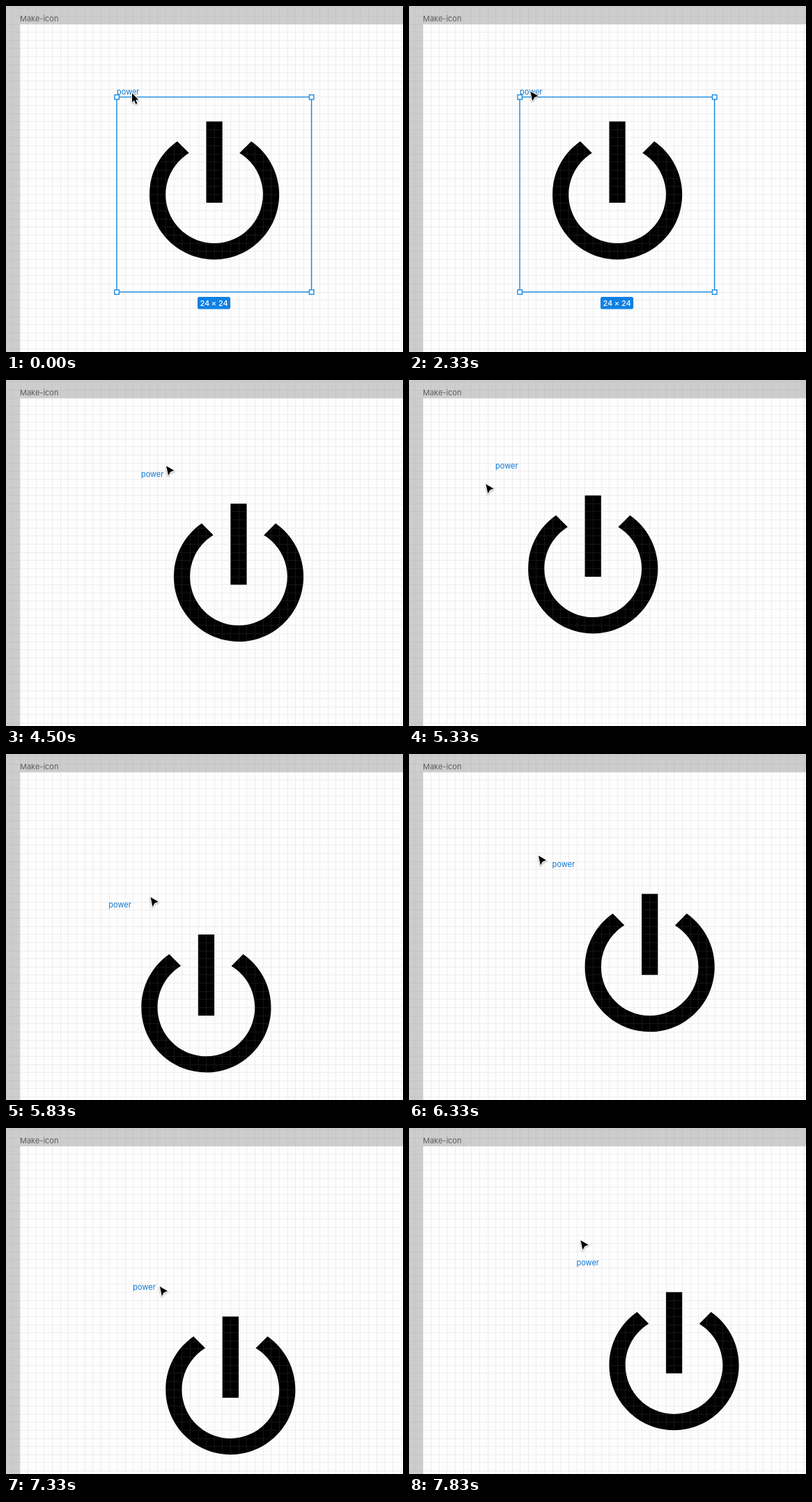
An HTML page that plays this animation: 570 by 496 pixels, repeating every 8 s.

```html
<!DOCTYPE html>
<html lang="en">
<head>
<meta charset="utf-8">
<title>Icon drag</title>
<style>
  html, body { margin: 0; width: 100%; height: 100%; overflow: hidden; background: #cdcdcd; }
  svg { display: block; width: 570px; height: 496px; }
  text { font: 11px Inter, "Liberation Sans", sans-serif; }
  .cursor { stroke: #fff; stroke-width: 2; stroke-linejoin: round; paint-order: stroke; filter: drop-shadow(0 1px 1px rgba(0, 0, 0, .35)); }
</style>
</head>
<body>
<svg viewBox="0 0 570 496">
  <rect width="570" height="496" fill="#cdcdcd"/>
  <rect x="20" y="26" width="550" height="470" fill="#fdfdfd"/>
  <g id="icon">
    <path transform="scale(11.64)" d="M13 3h-2v10h2zM16.56 5.44l-1.45 1.45C16.84 7.94 18 9.83 18 12c0 3.31-2.69 6-6 6s-6-2.69-6-6c0-2.17 1.16-4.06 2.88-5.12L7.44 5.44C5.36 6.88 4 9.28 4 12c0 4.42 3.58 8 8 8s8-3.58 8-8c0-2.72-1.36-5.12-3.44-6.56z"/>
  </g>
  <path id="grid" fill="none" stroke="#969696" stroke-opacity=".15" shape-rendering="crispEdges"/>
  <text x="20" y="22" fill="#5e5e5e">Make-icon</text>
  <text id="label" y="127" fill="#1079d3">power</text>
  <g id="selection" stroke="#1b8ae0" stroke-width="1.4">
    <rect x="159" y="130.5" width="279.6" height="279.5" fill="none"/>
    <g id="handles" fill="#fff"></g>
    <rect x="275" y="417" width="47" height="17.5" rx="2.5" fill="#0f80e3" stroke="none"/>
    <text x="298.5" y="430" text-anchor="middle" fill="#fff" stroke="none" font-weight="500" style="font-weight:500;letter-spacing:-.1px">24 × 24</text>
  </g>
  <path id="guide" fill="none" stroke="#f24822" stroke-width="1.3"/>
  <path id="systemArrow" class="cursor" d="M0 0V13L3 10.3L5.2 15.4L7.4 14.4L5.3 9.5H9.3Z"/>
  <path id="arrow" class="cursor" d="M.3 .5L11.5 7L6.2 9L3.2 14.3Z"/>
</svg>
<script>
const LOOP = 8000, FPS = 6, DRAG_START = 16;
const CELL = 11.64, LEFT = 20, TOP = 26;
const HOME = { x: 159.4, y: 130.6 };
const GRAB = { x: 174, y: 122 };
const CENTER_ROW = 4;

// Pointer travel in grid cells, one point per step of the drag.
const path = [
  [1, 2], [3, 3], [4, 2], [3, 1], [0, 0], [-4, 0],
  [-4, 1], [-3, 1], [-1, 1], [1, 1], [3, 1], [4.8, 0.06],
  [4, -2], [2, -2], [-1, -1], [-3, 0], [-5.49, 2.3], [-6, 6],
  [-1, 8], [2.86, 7.1], [5, 5], [4, 3], [1, 2], [-2, 2],
  [-4, 4], [-4.09, 5.03], [-1, 7], [2, 9], [4, 9], [6, 8],
  [7, 6], [6.2, 3.3]
];

const $ = id => document.getElementById(id);
const place = (id, x, y) => $(id).setAttribute("transform", `translate(${x} ${y})`);
const show = (id, on) => $(id).setAttribute("visibility", on ? "visible" : "hidden");
const cross = (x, y) => `M${x - 2} ${y - 2}l4 4m0 -4l-4 4`;

function buildStage() {
  let d = "";
  for (let x = LEFT - CELL; x < 570; x += CELL) d += `M${Math.floor(x) + .5} 0V496`;
  for (let y = TOP - 2 * CELL; y < 496; y += CELL) d += `M0 ${Math.floor(y) + .5}H570`;
  $("grid").setAttribute("d", d);
  $("handles").innerHTML = [159, 438.6].flatMap(x => [130.5, 410].map(y =>
    `<rect x="${x - 3.1}" y="${y - 3.1}" width="6.5" height="6.5"/>`)).join("");
}

function pointerAt(step) {
  if (step >= DRAG_START) {
    const [x, y] = path[step - DRAG_START];
    return [GRAB.x + x * CELL, GRAB.y + y * CELL];
  }
  const left = 1 - Math.min(step / 14, 1);
  return [GRAB.x + 7 * left, GRAB.y + 3 * left];
}

function render(time) {
  const step = Math.floor((time % LOOP + 5) * FPS / 1000) % (LOOP * FPS / 1000);
  // The icon follows one step behind the pointer, snapped to whole cells.
  const [col, row] = step > DRAG_START ? path[step - DRAG_START - 1].map(Math.round) : [0, 0];
  const dx = col * CELL, dy = row * CELL;

  place("icon", HOME.x + dx, HOME.y + dy);
  place("label", 159 + dx, dy);
  show("selection", step < DRAG_START);

  show("guide", row === CENTER_ROW);
  const cx = HOME.x + 12 * CELL + dx, cy = 317;
  $("guide").setAttribute("d", `M${LEFT} ${cy}H570${cross(LEFT, cy)}${cross(cx, cy)}`);

  const [px, py] = pointerAt(step);
  place("arrow", px, py);
  place("systemArrow", px, py);
  show("arrow", step > 0);
  show("systemArrow", step === 0);
}

function tick() {
  render(performance.now());
  requestAnimationFrame(tick);
}

buildStage();
tick();
</script>
</body>
</html>
```
